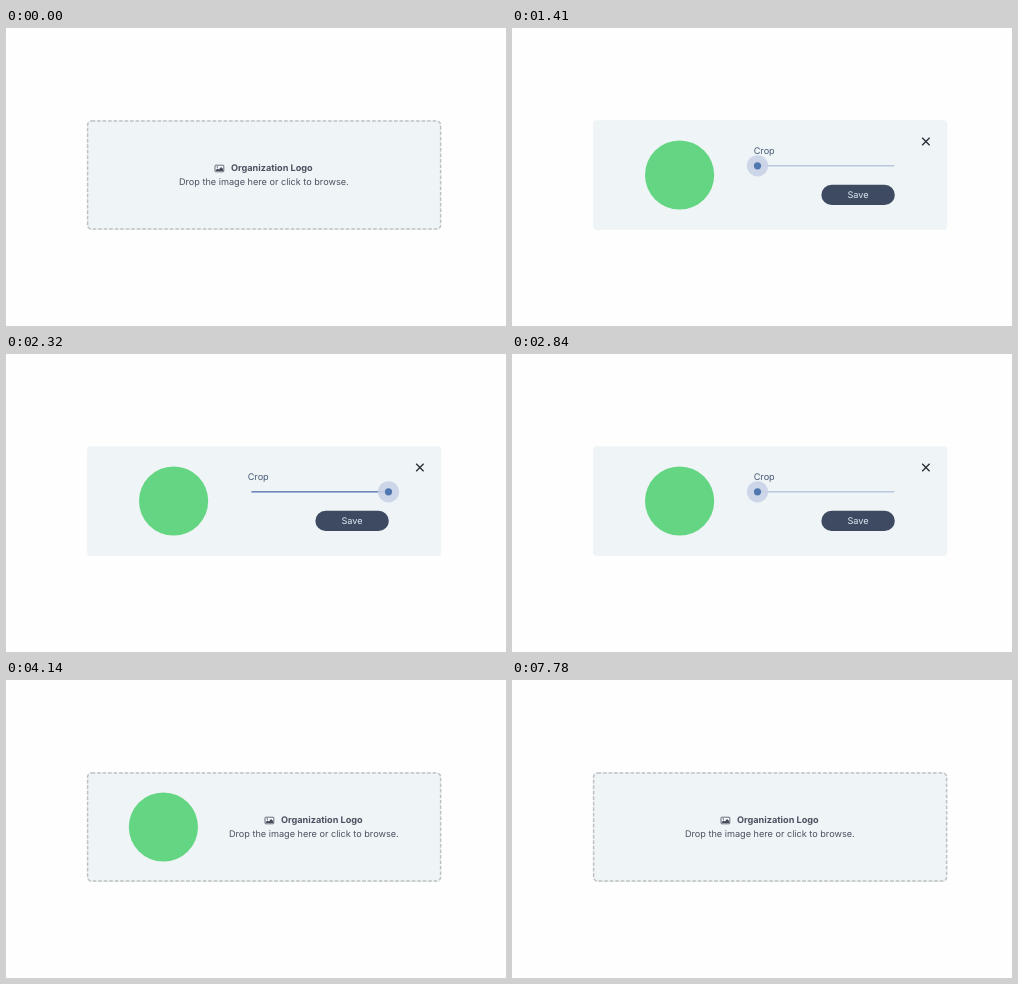
These frames come from a looping animation (500 px wide and 298 px high, 8 s). An HTML page:

```html
<!DOCTYPE html>
<html lang="en">
<head>
<meta charset="utf-8">
<title>Logo upload</title>
<style>
  html, body { margin: 0; width: 100%; height: 100%; overflow: hidden; background: #fefefe; }
  svg { display: block; width: 500px; height: 298px; }
  text {
    font: 400 9.15px Inter, "Noto Sans", sans-serif;
    fill: #4b5060;
    text-rendering: geometricPrecision;
  }
  .bold { font-weight: 700; }
</style>
</head>
<body>
<svg viewBox="0 0 500 298">
  <rect x="81" y="92.3" width="354.3" height="109.7" rx="4" fill="#eff4f6"/>
  <rect id="dashes" x="81.6" y="93.1" width="353" height="108" rx="4" fill="none"
        stroke="#bfc2c2" stroke-width="1.5" stroke-dasharray="3.6 1.9"/>

  <circle id="logo" cy="147" r="34.6" fill="#64d683"/>

  <g id="drop">
    <rect x="209" y="137.2" width="8.8" height="6.6" rx=".8" fill="#f8fbfc" stroke="#454b5c" stroke-width=".8"/>
    <path d="M209.8 143v-1l1.8-1.6 1.2 1 2.3-2.3 2 2V143z" fill="#454b5c"/>
    <circle cx="211.3" cy="139" r=".7" fill="#454b5c"/>
    <text class="bold" x="225" y="143.4">Organization Logo</text>
    <text x="173" y="157.1">Drop the image here or click to browse.</text>
  </g>

  <g id="crop">
    <text x="241.7" y="125.7" style="fill:#455a75">Crop</text>
    <path d="M245.5 137.8H382.5" stroke="#b9c8df" stroke-width="1.6"/>
    <path id="filled" stroke="#7182bd" stroke-width="1.6"/>
    <circle id="halo" cy="137.8" r="10.6" fill="#c8d2e6" fill-opacity=".88"/>
    <circle id="knob" cy="137.8" r="3.6" fill="#5077b0"/>
    <rect x="309.4" y="156.7" width="73.4" height="20.4" rx="10.2" fill="#3d4a61"/>
    <text x="346" y="170.2" text-anchor="middle" style="fill:#dce9f3">Save</text>
  </g>

  <g id="error">
    <circle cx="178" cy="147" r="32.2" fill="#bec6d4"/>
    <circle cx="178" cy="147" r="9.2" fill="#fcfdfe"/>
    <path d="M177 141.6h2l-.4 7h-1.2z" fill="#929bad"/>
    <circle cx="178" cy="151.3" r="1.1" fill="#929bad"/>
    <text x="266" y="142.4" style="font-weight:500;fill:#b5433f">Sorry, the upload failed.</text>
    <text class="bold" x="266" y="158.2">Try again</text>
    <path d="M266 159.8H307.7" stroke="#4b5060" stroke-width=".9"/>
  </g>

  <path id="close" d="M410.2 109.8l7.4 7.4m0-7.4l-7.4 7.4" stroke="#272c36" stroke-width="1.3" fill="none"/>
</svg>
<script>
  const LOOP = 8000, STEP = 130;
  const TRACK = { left: 245.5, right: 382.5, y: 137.8 };
  const el = id => document.getElementById(id);
  const set = (id, name, value) => el(id).setAttribute(name, value);
  const show = (id, on) => set(id, "visibility", on ? "visible" : "hidden");
  const progress = (t, from, to) => Math.min(1, Math.max(0, (t - from) / (to - from)));
  const ease = p => p * p * (3 - 2 * p);

  function render(time) {
    // The interface advances in steps, offset by 20 ms.
    const t = Math.max(0, Math.floor((time + 20) / STEP) * STEP - 20);
    const cropping = t >= 500 && t < 4140;
    const uploaded = t >= 4140 && t < 6480;
    const failed = t >= 6480 && t < 7780;
    const dropping = !cropping && !failed;

    show("dashes", dropping);
    show("drop", dropping);
    show("crop", cropping);
    show("error", failed);
    show("close", cropping || failed);
    show("logo", cropping || uploaded);
    set("logo", "cx", uploaded ? 157.4 : 167.6);
    set("drop", "transform", `translate(${uploaded ? 50 : 0} 0)`);

    const zoom = ease(progress(t, 1410, 2320)) - ease(progress(t, 2580, 2840));
    const x = TRACK.left + (TRACK.right - TRACK.left) * zoom;
    set("knob", "cx", x);
    set("halo", "cx", x);
    set("halo", "opacity", progress(t, 890, 1150) - progress(t, 3360, 3620));
    set("filled", "d", `M${TRACK.left} ${TRACK.y}H${x}`);
  }

  const start = performance.now();
  function tick() {
    render((performance.now() - start) % LOOP);
    requestAnimationFrame(tick);
  }
  tick();
</script>
</body>
</html>
```
